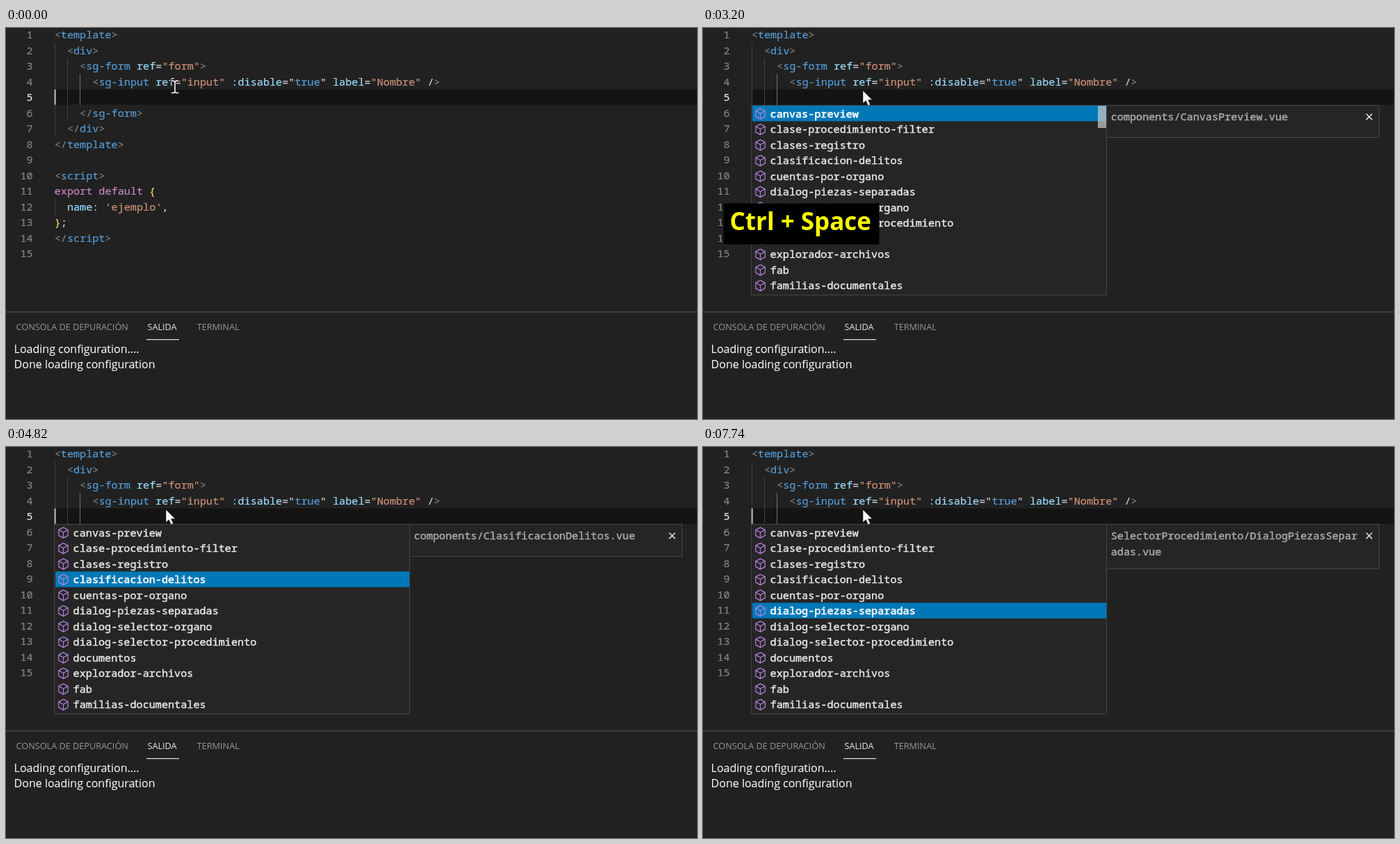
These frames come from a looping animation (994x563 px, 8 s). An HTML page:

```html
<!DOCTYPE html>
<html lang="es">
<head>
<meta charset="utf-8">
<title>Autocompletado</title>
<style>
html, body { margin: 0; width: 100%; height: 100%; overflow: hidden; background: #212121; }
svg { display: block; width: 994px; height: 563px; }
text { white-space: pre; }
text, tspan { fill: currentColor; stroke: currentColor; stroke-width: 0; }
.mono { font: 15.17px "Noto Sans Mono", monospace; }
.mono text, .mono tspan { stroke-width: .2px; }
.ui { font: 12.7px "Open Sans", sans-serif; color: #969696; }
.ui .log { font-size: 16px; color: #f2f2f2; stroke-width: .15px; }
.key { font: bold 35px "Open Sans", sans-serif; color: #ff0; }
.num { color: #858585; text-anchor: end; }
.on { color: #e7e7e7; }
.b { color: #808080; } .t { color: #569cd6; } .a { color: #9cdcfe; } .s { color: #ce9178; }
.w { color: #d4d4d4; } .k { color: #c586c0; } .y { color: #ffd75e; }
.guide { stroke: #404040; }
.box { fill: #252526; stroke: #454545; }
.mono .item { color: #e6e6e6; stroke-width: .5px; }
.mono .sel { color: #fff; stroke-width: .65px; }
.mono .path { color: #a9a9a9; stroke-width: .5px; }
.cube { fill: none; stroke: #b180d7; stroke-width: 1.2; stroke-linejoin: round; }
</style>
</head>
<body>
<svg viewBox="0 0 994 563">
  <rect x="71" y="88.5" width="923" height="22" fill="#141414"/>
  <path class="guide" d="M70.5 21V156M88.5 44V133M70.5 246V269"/>
  <path d="M106.5 66V111" stroke="#707070"/>
  <g id="code" class="mono"></g>

  <rect y="408" width="994" height="1.6" fill="#474747"/>
  <g class="ui">
    <text x="14.5" y="435">CONSOLA DE DEPURACIÓN</text>
    <text x="203.5" y="435" class="on">SALIDA</text>
    <text x="274.7" y="435">TERMINAL</text>
    <text x="11.6" y="467.5" class="log">Loading configuration....</text>
    <text x="11.6" y="490" class="log">Done loading configuration</text>
  </g>
  <rect x="202" y="448" width="47" height="1.2" fill="#e7e7e7"/>

  <rect id="caret" x="69.5" y="88.5" width="2.3" height="22" fill="#aeafad"/>

  <g id="popup" class="mono">
    <rect class="box" x="69.5" y="111.5" width="511" height="273"/>
    <g id="rows"></g>
    <rect id="slider" x="568" y="112" width="12" height="32" fill="#c6c6c2"/>
  </g>
  <g id="doc" class="mono">
    <rect id="small" class="box" x="580.5" y="111.5" width="392" height="46"/>
    <rect id="tall" class="box" x="580.5" y="111.5" width="392" height="64"/>
    <g id="paths"></g>
    <path d="M954 123.5l8.6 8.6m0-8.6l-8.6 8.6" stroke="#e0e0e0" stroke-width="1.5"/>
  </g>

  <g id="keys">
    <rect x="29.5" y="252.5" width="224" height="59"/>
    <text x="38.5" y="291" class="key">Ctrl + Space</text>
  </g>

  <g id="beam" fill="none" stroke-linecap="square">
    <path d="M238.5 76h2.5l2 1.5l2-1.5h2.5M243 77.5V92M238.5 93.5h2.5l2-1.5l2 1.5h2.5" stroke="#111" stroke-width="3"/>
    <path d="M238.5 76h2.5l2 1.5l2-1.5h2.5M243 77.5V92M238.5 93.5h2.5l2-1.5l2 1.5h2.5" stroke="#fff" stroke-width="1.6"/>
  </g>
  <path id="arrow" d="M230 90v18.5l4.3-3.8l3.1 7l3.2-1.4l-3-6.8h5.8z" fill="#fff" stroke="#111" stroke-width=".6"/>
  <path id="move" d="M242.5 88l2.2 2.8h-4.4zM242.5 98.4l2.2-2.8h-4.4zM237.3 93.2l2.8-2.2v4.4zM247.7 93.2l-2.8-2.2v4.4zM241.7 92.4h1.6v1.6h-1.6z" fill="#fff"/>
</svg>
<script>
const LOOP = 8000, LINE = 22.5, CHAR = 9.1;
const $ = id => document.getElementById(id);

function add(parent, tag, attrs, text = '') {
  const el = document.createElementNS('http://www.w3.org/2000/svg', tag);
  for (const key in attrs) el.setAttribute(key, attrs[key]);
  el.textContent = text;
  return parent.appendChild(el);
}

// Loops a list of [ms, style] stops, holding each value unless an easing is given.
function play(el, stops, easing = 'steps(1, end)') {
  const frames = stops.map(([ms, style]) => ({ ...style, offset: ms / LOOP, easing }));
  frames.push({ ...stops[stops.length - 1][1], offset: 1 });
  el.animate(frames, { duration: LOOP, iterations: Infinity, delay: -5 });
}

// Flips visibility at each of the given times.
function toggle(el, visible, ...times) {
  play(el, [0, ...times].map((ms, i) =>
    [ms, { visibility: visible === (i % 2 === 0) ? 'visible' : 'hidden' }]));
}

// Each line: indent, then tokens whose first letter is their colour class.
const lines = [
  [0, 'b<', 'ttemplate', 'b>'],
  [2, 'b<', 'tdiv', 'b>'],
  [4, 'b<', 'tsg-form', 'a ref', 'w=', 's"form"', 'b>'],
  [6, 'b<', 'tsg-input', 'a ref', 'w=', 's"input"', 'a :disable', 'w="', 'ttrue', 'w"', 'a label', 'w=', 's"Nombre"', 'w /', 'b>'],
  [0],
  [4, 'b</', 'tsg-form', 'b>'],
  [2, 'b</', 'tdiv', 'b>'],
  [0, 'b</', 'ttemplate', 'b>'],
  [0],
  [0, 'b<', 'tscript', 'b>'],
  [0, 'kexport default', 'y {'],
  [2, 'aname:', "s 'ejemplo'", 'w,'],
  [0, 'y}', 'w;'],
  [0, 'b</', 'tscript', 'b>'],
  [0]
];
lines.forEach(([indent, ...tokens], i) => {
  const y = 15 + i * LINE;
  add($('code'), 'text', { x: 38.7, y, class: i === 4 ? 'num on' : 'num' }, i + 1);
  const row = add($('code'), 'text', { x: 69.7 + indent * CHAR, y });
  for (const tok of tokens) add(row, 'tspan', { class: tok[0] }, tok.slice(1));
});

const items = ['canvas-preview', 'clase-procedimiento-filter', 'clases-registro',
  'clasificacion-delitos', 'cuentas-por-organo', 'dialog-piezas-separadas',
  'dialog-selector-organo', 'dialog-selector-procedimiento', 'documentos',
  'explorador-archivos', 'fab', 'familias-documentales'];
const picks = [2490, 3700, 4210, 4820, 5330, 6980, LOOP];
const open = 2490, docOpen = 2640;

function label(parent, name, y, cls) {
  add(parent, 'path', { class: 'cube', d: `M82.5 ${y - 12.8}l6.7 3.5v8l-6.7 3.7l-6.7-3.7v-8zm-6.7 3.5l6.7 3.6l6.7-3.6m-6.7 3.6v7.9` });
  add(parent, 'text', { x: 96.6, y, class: cls }, name);
}

// Shows an element for one stretch of the loop.
function span(el, from, to) {
  toggle(el, false, ...[from, to].filter(ms => ms < LOOP));
}

items.forEach((name, i) => {
  const y = 128.7 + i * LINE;
  const row = add($('rows'), 'g', {});
  label(row, name, y, 'item');
  span(row, open, LOOP);
  if (i >= picks.length - 1) return;

  const [from, to] = [picks[i], picks[i + 1]];
  const picked = add($('rows'), 'g', {});
  add(picked, 'rect', { x: 71, y: 111.8 + i * LINE, width: 509.5, height: LINE, fill: '#0078b8' });
  label(picked, name, y, 'sel');
  span(picked, from, to);

  const pascal = name.replace(/(^|-)(.)/g, (m, dash, c) => c.toUpperCase());
  const file = (i === 5 ? 'SelectorProcedimiento/' : 'components/') + pascal + '.vue';
  const path = add($('paths'), 'g', {});
  file.match(/.{1,39}/g).forEach((part, n) =>
    add(path, 'text', { x: 586.7, y: 133.3 + n * LINE, class: 'path' }, part));
  span(path, Math.max(from, docOpen), to);
});

span($('popup'), open, LOOP);
span($('doc'), docOpen, LOOP);
span($('small'), docOpen, picks[5]);
span($('tall'), picks[5], LOOP);
span($('keys'), 1880, 3500);
toggle($('caret'), true, 220, 730, 1230, 1680, 2200, 2250, 3100, 3600, 4160, 4620,
  5120, 5630, 6120, 6630, 7230, 7740);
play($('slider'), [[0, { opacity: 1 }], [2990, { opacity: 1 }], [3790, { opacity: 0 }]], 'linear');

const at = (x, y) => ({ transform: `translate(${x}px, ${y}px)` });
play($('beam'), [[0, at(0, 0)], [1180, at(-4, 2)], [1230, at(-9, 5)], [1290, at(-13, 7)]]);
toggle($('beam'), true, 2250);
span($('arrow'), 2250, LOOP);
span($('move'), 2250, 2540);
</script>
</body>
</html>
```
